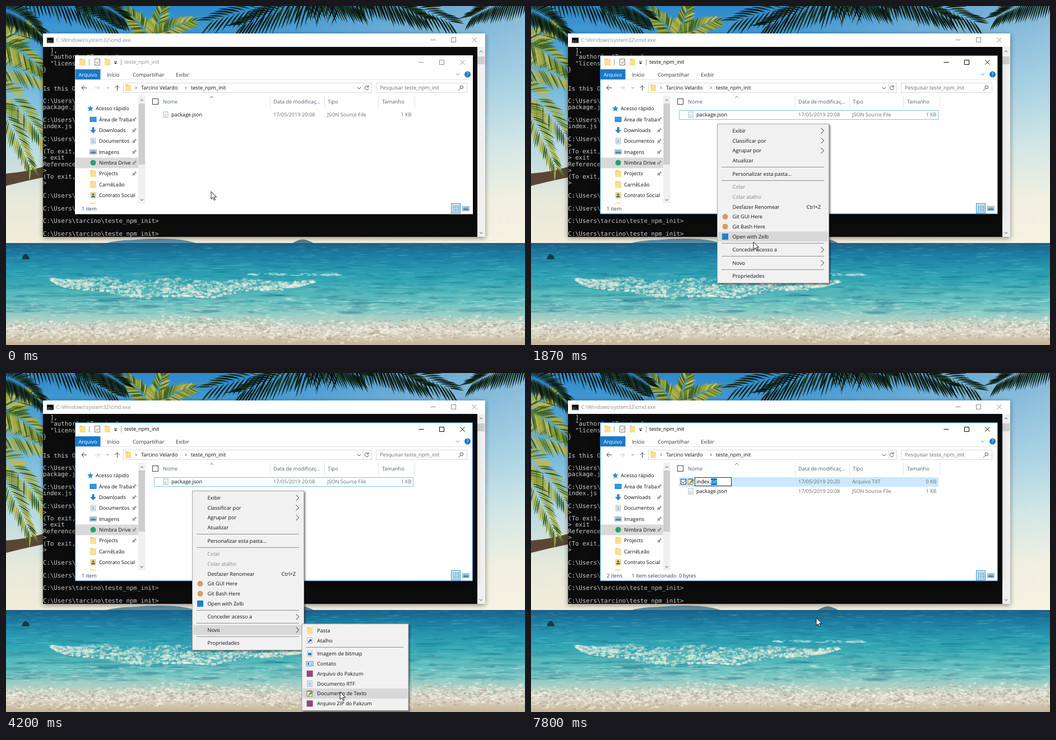
Write an HTML page with a canvas that moves like this. It is 926 px wide and 605 px high and loops after 8000 ms.

```html
<!DOCTYPE html>
<html lang="pt">
<head>
<meta charset="utf-8">
<title>New text file</title>
<style>
html, body { margin: 0; width: 100%; height: 100%; overflow: hidden; }
#stage { position: relative; width: 926px; height: 605px; overflow: hidden; }
#stage > canvas, #stage > svg { position: absolute; left: 0; top: 0; }
text, #edit { font: 9.15px "Open Sans", "Noto Sans", sans-serif; text-rendering: geometricPrecision; white-space: pre; }
text.mono { font: 10.72px "DejaVu Sans Mono", monospace; }
.line { fill: none; stroke-width: 1; }
#frame { filter: drop-shadow(0 2px 5px rgba(0,0,0,.4)); }
#frame.active { filter: drop-shadow(0 4px 8px rgba(0,0,0,.5)); stroke: #1b7fd0; }
#console { filter: drop-shadow(0 2px 4px rgba(0,0,0,.45)); }
.panel { filter: drop-shadow(2px 2px 1.5px rgba(0,0,0,.5)); }
#edit { position: absolute; left: 292px; top: 186px; height: 14px; line-height: 14px; padding: 0 25px 0 2px; border: 1px solid #23301f; background: #fff; color: #000; }
#sel { display: inline-block; height: 12px; line-height: 12px; background: #0a78d6; color: #fff; }
#caret { display: inline-block; width: 1px; height: 11px; margin: 0 -.5px; background: #000; vertical-align: -2px; }
</style>
</head>
<body>
<div id="stage">
  <canvas id="beach" width="926" height="605"></canvas>
  <svg id="windows" width="926" height="605"></svg>
  <div id="edit"><span id="pre"></span><span id="sel"></span><i id="caret"></i><span id="post"></span></div>
  <svg id="menus" width="926" height="605"></svg>
  <svg width="926" height="605"><path id="cursor" d="M0 0V13.6L3.2 10.7L5.4 15.6L7.4 14.7L5.3 9.9H9.5Z" fill="#fff" stroke="#000" stroke-width=".9"/></svg>
</div>
<script>
const $ = id => document.getElementById(id);

// ---------- beach ----------
const ctx = $('beach').getContext('2d');
let seed = 7;
const rnd = () => (seed = (seed * 16807) % 2147483647) / 2147483647;

function gradient(y0, y1, stops) {
  const g = ctx.createLinearGradient(0, y0, 0, y1);
  stops.forEach(([at, color]) => g.addColorStop(at, color));
  ctx.fillStyle = g;
  ctx.fillRect(0, y0, 926, y1 - y0);
}

function shape(color, d) {
  ctx.fillStyle = color;
  ctx.fill(new Path2D(d));
}

function blob(x, y, rx, ry, color) {
  ctx.fillStyle = color;
  ctx.beginPath();
  ctx.ellipse(x, y, rx, ry, 0, 0, 7);
  ctx.fill();
}

function blade(x, y, angle, len, width) {
  const tx = x + Math.cos(angle) * len, ty = y + Math.sin(angle) * len + len * .15;
  const mx = (x + tx) / 2, my = (y + ty) / 2 - len * .08;
  const nx = -Math.sin(angle) * width, ny = Math.cos(angle) * width;
  ctx.beginPath();
  ctx.moveTo(x, y);
  ctx.quadraticCurveTo(mx + nx, my + ny, tx, ty);
  ctx.quadraticCurveTo(mx - nx, my - ny, x, y);
  ctx.fill();
}

function frond([x, y, angle, len, droop, leaf], colors) {
  const dx = Math.cos(angle) * len, dy = Math.sin(angle) * len;
  for (let i = 2; i < 28; i++) {
    const s = i / 27, turn = Math.atan2(dy + 2 * droop * s, dx);
    for (const side of [-1, 1]) {
      ctx.fillStyle = colors[Math.floor(rnd() * colors.length)];
      blade(x + dx * s, y + dy * s + droop * s * s, turn + side * (1.05 - .6 * s), leaf * (1 - .4 * s) * (.8 + .3 * rnd()), 3);
    }
  }
}

function drawSky() {
  gradient(0, 424, [[0, '#2d88ca'], [.12, '#449ad3'], [.35, '#74b9de'], [.58, '#b5d9e2'], [.8, '#e6e9da'], [1, '#f2ecda']]);
  const glow = ctx.createLinearGradient(420, 0, 926, 0);
  glow.addColorStop(0, 'rgba(255,250,236,0)');
  glow.addColorStop(1, 'rgba(255,250,236,.42)');
  ctx.fillStyle = glow;
  ctx.fillRect(0, 0, 926, 424);
  shape('#5b8fa6', 'M176 424Q195 418 225 417.5Q265 414 300 416Q325 418 342 424Z');
  shape('#587f90', 'M510 424Q522 416 530 416.5Q538 417 550 424Z');
}

function drawSea() {
  gradient(423, 605, [[0, '#1b5f86'], [.1, '#1b7a9f'], [.25, '#2798b0'], [.37, '#33a6b4'], [.48, '#4fb5b8'],
    [.6, '#67bfbe'], [.7, '#93cbc4'], [.79, '#c3d3c7'], [.88, '#dcd5c3'], [1, '#c4b398']]);
  ctx.filter = 'blur(.7px)';
  for (let i = 0; i < 1100; i++) {
    const depth = rnd(), y = 425 + depth * 125;
    blob(rnd() * 926, y, 4 + rnd() * 26 * (depth + .3), .5 + rnd() * 2.2 * (depth + .2), i % 2 ? 'rgba(6,84,122,.15)' : 'rgba(165,228,222,.13)');
  }
  for (let i = 0; i < 1300; i++) {
    const u = rnd(), top = 485 + 6 * u + 2.5 * Math.sin(u * 23), thick = 5 + 28 * Math.sin(Math.PI * Math.pow(u, .8));
    const fall = rnd();
    blob(80 + u * 470, top + fall * thick, 1 + rnd() * 4, .7 + rnd() * 1.8, i % 4 ? `rgba(240,241,226,${.3 + .3 * fall})` : 'rgba(110,178,176,.45)');
  }
  for (let i = 0; i < 350; i++) {
    const x = rnd() * 926;
    blob(x, 522 + rnd() * 34, 2 + rnd() * 9, .5 + rnd(), 'rgba(228,240,228,.25)');
    if (i < 60) blob(430 + rnd() * 170, 477 + rnd() * 4, 2 + rnd() * 5, .7, 'rgba(235,246,238,.5)');
  }
  for (let i = 0; i < 2600; i++) {
    const x = rnd() * 926, y = 577 + 4 * Math.sin(x / 75) + (rnd() + rnd() - 1) * 22;
    blob(x, y, .8 + rnd() * 3.5, .6 + rnd() * 1.6, i % 5 < 3 ? 'rgba(248,243,230,.5)' : 'rgba(158,146,124,.3)');
  }
  ctx.filter = 'none';
  shape('#17384c', 'M28 452Q30 444 35 442Q41 445 42 452Z');
}

function drawPalms() {
  shape('#5b4634', 'M0 299Q32 297 70 286V305Q35 312 0 321Z');
  const light = ['#8c9c35', '#a9ac43', '#5d7c2c', '#bdb75a', '#3d6128'];
  const dark = ['#0d1d12', '#12281a', '#1b3520', '#09140e'];
  [[262, 62, -2.2, 75, 8, 32], [262, 62, -1.3, 72, 5, 32], [265, 60, -.7, 85, 22, 30],
   [-25, 90, -.9, 110, 35, 42], [-30, 110, -.1, 115, 45, 42], [-25, 140, .5, 110, 55, 42],
   [-25, 160, .9, 110, 40, 38], [-20, 60, .3, 95, 30, 40]].forEach(f => frond(f, light));
  [[15, -35, .28, 185, 22, 46], [-15, 5, .1, 85, 45, 38], [110, -25, .2, 100, 25, 46], [625, -28, 3.05, 255, 30, 58],
   [600, -40, 2.75, 190, 0, 58], [520, -35, .25, 110, 10, 58], [590, -35, .12, 200, 38, 58],
   [610, -30, .3, 140, 10, 50], [945, -30, 2.85, 115, 14, 45]].forEach(f => frond(f, dark));
}

// ---------- interface helpers ----------
const label = (x, y, s, fill = '#111', more = '') => `<text x="${x}" y="${y + 3.2}" fill="${fill}" ${more}>${s}</text>`;
const rect = (x, y, w, h, fill, more = '') => `<rect x="${x}" y="${y}" width="${w}" height="${h}" fill="${fill}" ${more}/>`;
const line = (d, stroke = '#444', more = '') => `<path class="line" d="${d}" stroke="${stroke}" ${more}/>`;
const at = (x, y, body) => `<g transform="translate(${x} ${y})">${body}</g>`;
const chevron = (x, y, turn, size = 2.5, color = '#444') =>
  `<path class="line" stroke="${color}" transform="translate(${x} ${y}) rotate(${turn})" d="M${-size / 2} ${-size}L${size / 2} 0L${-size / 2} ${size}"/>`;
const controls = (x, y) => line(`M${x} ${y}h9M${x + 37} ${y - 4}h8v8h-8zM${x + 74} ${y - 4}l8 8m0-8l-8 8`, 'currentColor');

const page = rect(-4, -5, 8, 10, '#fff', 'stroke="#8ba3b8" stroke-width=".8"');
const icons = {
  folder: '<path d="M-5-6h4l1 1h5v11h-10z" fill="#e9bd55"/><path d="M-5-4.5h10v10.5h-10z" fill="#fbdf8c"/>',
  star: '<path d="M0-5.5L1.6-1.9L5.5-1.6L2.5 1L3.5 5L0 2.9L-3.5 5L-2.5 1L-5.5-1.6L-1.6-1.9Z" fill="#2a8ddd"/>',
  screen: rect(-6, -4.5, 12, 9, '#1878c8') + rect(-5, -3.5, 10, 6.5, '#2d9cec'),
  down: '<path d="M-2-5.5h4v5h3.5L0 5.5L-5.5-.5H-2z" fill="#2c7fcb"/>',
  page: page + line('M-2.5-2.5h2M-2.5 0h5M-2.5 2.5h5M1-3v2', '#3c84bd'),
  image: rect(-6, -4, 12, 8, '#fff', 'stroke="#93a4b0" stroke-width=".8"') + rect(-5, -3, 10, 3, '#78b5dd') + rect(-5, 0, 10, 3, '#4b7891'),
  cloud: '<circle r="5" fill="#25a365"/>',
  person: rect(-5, -5.5, 10, 11, '#f9d16b') + '<circle cy="-1.5" r="1.8" fill="#2872b4"/>' + rect(-3, 1, 6, 2.7, '#2872b4'),
  json: page + label(-2.7, -.3, '{}', '#7c9b62', 'style="font-size:6px"'),
  note: rect(-5, -4, 9, 9, '#fffce0', 'stroke="#6a6f58" stroke-width=".9"') + line('M-4-5h7', '#555') + '<path d="M-4 4.5L-1 0L4-5L6-3L1 2Z" fill="#62933a"/><path d="M-4 4.5L-2 1L0 3Z" fill="#e0a92c"/>',
  link: page + '<path d="M-2.5 3.5Q-2.5 0 0-.7L-1-2.5H3V2L1.7.8Q-.5 1.2-1 3.5Z" fill="#1f5f9c"/>',
  bitmap: page + rect(-3, -2, 6, 5, '#2f86c8'),
  contact: rect(-6, -4, 12, 8, '#d7ecf8', 'stroke="#4c91bd"') + rect(-4, -2, 3, 4, '#3087c3') + line('M1-1h3M1 1.5h3', '#4c91bd'),
  archive: rect(-5.5, -5.5, 11, 11, '#8b4a78'),
  branch: '<circle r="5" fill="#e0985a"/>',
  editor: rect(-5.5, -5.5, 11, 11, '#1f80cb')
};
const icon = (name, x, y) => at(x, y, icons[name]);

// ---------- windows ----------
const prompt = 'C:\\Users\\tarcino\\teste_npm_init&gt;';
const output = `  ],
  "author": "Tarcino",
  "license": "ISC"
}


Is this OK? (yes)

${prompt}dir /b
package.json

${prompt}dir /b
index.js

${prompt}node
&gt;
(To exit, press ^C again)
&gt; exit
ReferenceError
&gt;
(To exit, press ^C again)
&gt;

${prompt}

${prompt}

${prompt}

${prompt}`;

function consoleWindow() {
  const rows = output.split('\n').map((s, i) => `<text class="mono" x="66" y="${83 + i * 11.26}" fill="#ccc">${s}</text>`);
  return rect(66, 49, 789, 363, '#fff', 'id="console"') + rect(66, 73, 775, 339, '#0c0c0c') + rows.join('') +
    rect(841, 73, 14, 339, '#f0f0f0') + rect(841, 90, 13, 14, '#cdcdcd') + chevron(847.5, 81, -90) + chevron(847.5, 405, 90) +
    rect(73, 56.5, 12, 9.5, '#050505', 'stroke="#999" stroke-width=".8"') + label(74.5, 61.5, 'C:\\', '#fff', 'style="font-size:5.5px"') +
    label(89.5, 61, 'C:\\Windows\\system32\\cmd.exe', '#8b8b8b') + `<g color="#888">${controls(757.5, 60.5)}</g>`;
}

function navPane() {
  const items = [['Acesso rápido', 'star'], ['Área de Traba', 'screen'], ['Downloads', 'down'], ['Documentos', 'page'], ['Imagens', 'image'],
    ['Nimbra Drive', 'cloud'], ['Projects', 'folder'], ['CarnêLeão', 'folder'], ['Contrato Social', 'person']];
  let out = rect(124, 270.5, 112, 19, '#d9d9d9');
  items.forEach(([name, kind], i) => {
    const y = 183 + i * 19.35;
    out += icon(kind, i ? 155.5 : 150.5, y) + label(i ? 166 : 160, y, name);
    if (i > 0 && i < 7) out += at(229, y, '<path transform="rotate(45)" d="M-2-4h4v1h-1v3l2 1.5v1h-2.5v3h-1v-3h-2.5v-1l2-1.5v-3h-1z" fill="#8b9299"/>');
  });
  return out + rect(150, 351, 10, 1.5, '#f6d377') + rect(236, 160, 12.5, 192, '#f0f0f0') + rect(236.5, 174, 11.5, 109, '#cdcdcd') +
    chevron(242.3, 168, -90) + chevron(242.3, 346, 90);
}

function fileRow(y, name, kind, time, type, size) {
  return icon(kind, 285, y) + label(295, y, name) + label(477, y, time, '#6d6d6d') +
    label(573, y, type, '#6d6d6d') + label(723.5, y, size, '#6d6d6d', 'text-anchor="end"');
}

function explorer() {
  const head = '#4c607a';
  return rect(123.5, 88.5, 709, 282.5, '#fff', 'id="frame" stroke="#fff"') +
    icon('folder', 136.5, 100) + line('M148.5 95v11M205.5 95v11', '#999') + icon('folder', 181, 100) +
    rect(158.5, 94.5, 9, 11, '#fff', 'stroke="#777"') + line('M160.5 100l2 2.5l4-5', '#b0502c') +
    line('M193 99h5', '#222') + '<path d="M193 101h5l-2.5 3z" fill="#222"/>' +
    `<g id="caption">${label(211, 100, 'teste_npm_init', 'currentColor')}${controls(736.5, 100.5)}</g>` +
    rect(123.5, 113, 45, 18.5, '#1979ca') + label(146, 122.5, 'Arquivo', '#fff', 'text-anchor="middle"') +
    label(180, 122.5, 'Início', '#333') + label(226, 122.5, 'Compartilhar', '#333') + label(303, 122.5, 'Exibir', '#333') +
    chevron(806, 122, 90, 3, '#777') + '<circle cx="823.5" cy="122" r="5.5" fill="#1979ca"/>' +
    label(823.5, 122, '?', '#fff', 'text-anchor="middle" font-weight="bold"') + line('M124 131.5h708', '#e3e4e6') +
    line('M144 146h-9m4-4l-4 4l4 4', '#333') + line('M158 146h9m-4-4l4 4l-4 4', '#c9c9c9') + chevron(181.5, 146, 90, 2, '#666') +
    line('M198.5 151v-9m-4 4l4-4l4 4', '#444') +
    rect(209.5, 137.5, 443, 17, '#fff', 'stroke="#d9d9d9"') + rect(660.5, 137.5, 162, 17, '#fff', 'stroke="#d9d9d9"') +
    icon('folder', 218, 146) + chevron(232, 146, 0, 2) + label(241, 146, 'Tarcino Velardo') + chevron(321, 146, 0, 2) + label(330, 146, 'teste_npm_init') +
    chevron(630, 146.5, 90, 3) + line('M637.5 138v16', '#d9d9d9') + line('M646.5 144a3.5 3.5 0 1 0 .5 3M647 141.5v3h-3', '#555') +
    label(667, 146, 'Pesquisar teste_npm_init', '#6d6d6d') + line('M807 151l3.5-3.5M810 145a2.8 2.8 0 1 1 5.6 0a2.8 2.8 0 1 1-5.6 0', '#555') +
    navPane() +
    rect(261.5, 165.5, 10, 10, '#fff', 'stroke="#444"') + label(280, 171, 'Nome', head) + chevron(367, 162.5, -90, 3, '#777') +
    line('M471.5 160v22M568.5 160v22M664.5 160v22M729.5 160v22', '#e2e2e2') +
    label(477, 171, 'Data de modificaç...', head) + label(574, 171, 'Tipo', head) + label(671, 171, 'Tamanho', head) +
    rect(264.5, 186.5, 462, 16, 'none', 'id="focus" stroke="#7cc4ec"') +
    `<g id="fresh">${rect(264, 186, 463, 17, '#cce8ff')}${rect(267.5, 189.5, 9, 9, '#fff', 'stroke="#333"')}${line('M269 194l2.5 2.5l4-5', '#222')}
      ${fileRow(194, '', 'note', '17/05/2019 20:20', 'Arquivo TXT', '0 KB')}</g>` +
    `<g id="freshName">${label(295, 194, 'Novo Documento de Texto.txt')}</g>` +
    `<g id="package">${fileRow(194, 'package.json', 'json', '17/05/2019 20:08', 'JSON Source File', '1 KB')}</g>` +
    `<g id="one">${label(135, 362, '1 item', '#26415f')}</g>` +
    `<g id="two">${label(135, 362, '2 itens', '#26415f') + label(179.5, 362, '1 item selecionado', '#26415f') + label(264, 362, '0 bytes', '#26415f')}</g>` +
    rect(794.5, 352.5, 16, 17, '#cce8ff', 'stroke="#26a0da"') +
    line('M797 357h3m1 0h3m1 0h4M797 360h3m1 0h3m1 0h4M797 363h3m1 0h3m1 0h4M797 366h3m1 0h3m1 0h4', '#53717f') + icon('image', 820.5, 361.5);
}

// ---------- menus ----------
function menu(id, x, y, w, items) {
  const rows = [];
  let top = y + 3.7, out = '';
  for (const item of items) {
    if (!item) {
      out += line(`M${x + 8} ${Math.round(top + 2.4) + .5}H${x + w - 9}`, '#8f8f8f');
      top += 5.75;
      continue;
    }
    const [name, kind, extra] = item, mid = top + 8.9;
    rows.push(top);
    out += label(x + 27.5, mid, name, extra === 'off' ? '#858585' : '#111');
    if (kind) out += icon(kind, x + 14.5, mid);
    if (extra === '>') out += chevron(x + w - 12, mid, 0, 5, '#222');
    if (extra === 'Ctrl+Z') out += label(x + w - 15, mid, extra, '#111', 'text-anchor="end"');
    top += 17.75;
  }
  const html = `<g id="${id}">${rect(x + .5, y + .5, w - 1, top + 3 - y, '#f1f1f1', 'class="panel" stroke="#a5a5a5"')}
    ${rect(x + 2, 0, w - 4, 17.75, '#d8d8d8', `id="${id}Hover"`)}${out}</g>`;
  return { id, rows, html };
}

const main = menu('main', 332, 210, 200, [
  ['Exibir', '', '>'], ['Classificar por', '', '>'], ['Agrupar por', '', '>'], ['Atualizar'], null,
  ['Personalizar esta pasta...'], null,
  ['Colar', '', 'off'], ['Colar atalho', '', 'off'], ['Desfazer Renomear', '', 'Ctrl+Z'],
  ['Git GUI Here', 'branch'], ['Git Bash Here', 'branch'], ['Open with Zelb', 'editor'], null,
  ['Conceder acesso a', '', '>'], null, ['Novo', '', '>'], null, ['Propriedades']]);
const sub = menu('sub', 527.5, 447.3, 191, [
  ['Pasta', 'folder'], ['Atalho', 'link'], null,
  ['Imagem de bitmap', 'bitmap'], ['Contato', 'contact'], ['Arquivo do Pakzum', 'archive'],
  ['Documento RTF', 'page'], ['Documento de Texto', 'note'], ['Arquivo ZIP do Pakzum', 'archive']]);

function hover(m, y) {
  const top = m.rows.find(r => y >= r && y < r + 17.75);
  show(m.id + 'Hover', top !== undefined);
  if (top !== undefined) $(m.id + 'Hover').setAttribute('y', top);
}

// ---------- timeline, in steps of 1/15 s ----------
const path = [[0, 366, 331], [5, 345, 288], [10, 320, 224], [13, 332, 210], [18, 332, 210], [21, 357, 272], [25, 386, 378],
  [27, 396, 414], [28, 397, 421], [32, 391, 462], [38, 391, 462], [40, 385, 460], [44, 545, 459], [45, 545, 459],
  [58, 592, 556], [63, 596, 569], [68, 596, 569], [78, 509, 437]];
const typing = [[70, '', 'Novo Documento de Texto', '.txt'], [90, 'i', '', '.txt'], [91, 'in', '', '.txt'], [92, 'ind', '', '.txt'],
  [95, 'inde', '', '.txt'], [99, 'index', '', '.txt'], [105, 'index.', '', 'txt'], [109, 'index.', 'txt', '']];

function pointer(k) {
  const next = path.findIndex(p => p[0] > k);
  if (next < 1) return path[next < 0 ? path.length - 1 : 0].slice(1);
  const [k0, x0, y0] = path[next - 1], [k1, x1, y1] = path[next], s = (k - k0) / (k1 - k0);
  return [x0 + (x1 - x0) * s, y0 + (y1 - y0) * s];
}

const show = (id, on) => { $(id).style.display = on ? '' : 'none'; };
const fade = (k, start) => [.35, .75][k - start] ?? 1;

function render(k) {
  const [x, y] = pointer(k), [hx, hy] = pointer(Math.max(0, k - 1));
  $('cursor').setAttribute('transform', `translate(${Math.round(x)} ${Math.round(y)})`);

  const active = k >= 16, created = k >= 69;
  $('frame').classList.toggle('active', active);
  $('caption').style.color = active ? '#000' : '#8d8d8d';
  show('focus', active && !created);
  show('fresh', created);
  show('one', !created);
  show('two', created);
  $('package').setAttribute('transform', `translate(0 ${created ? 17 : 0})`);

  show('main', k >= 17 && k < 68);
  show('sub', k >= 35 && k < 68);
  $('main').style.opacity = fade(k, 17);
  $('sub').style.opacity = fade(k, 35);
  const inSub = hx >= 528;
  hover(main, inSub ? 458 : hy);
  hover(sub, inSub ? hy : -1);

  const entry = typing.filter(e => e[0] <= k).pop();
  show('edit', entry);
  show('freshName', created && !entry);
  if (entry) {
    const [since, pre, sel, post] = entry;
    $('pre').textContent = pre;
    $('sel').textContent = sel;
    $('post').textContent = post;
    show('sel', sel);
    $('caret').style.visibility = Math.floor((k - since) / 8) % 2 ? 'hidden' : 'visible';
  }
}

drawSky();
drawSea();
drawPalms();
$('windows').innerHTML = consoleWindow() + explorer();
$('menus').innerHTML = main.html + sub.html;

const begin = performance.now();
let last = -1;
function tick() {
  const t = (performance.now() - begin) % 8000;
  const k = Math.min(119, Math.floor((t + 3.4) * 15 / 1000));
  if (k !== last) render(last = k);
  requestAnimationFrame(tick);
}
tick();
</script>
</body>
</html>
```
